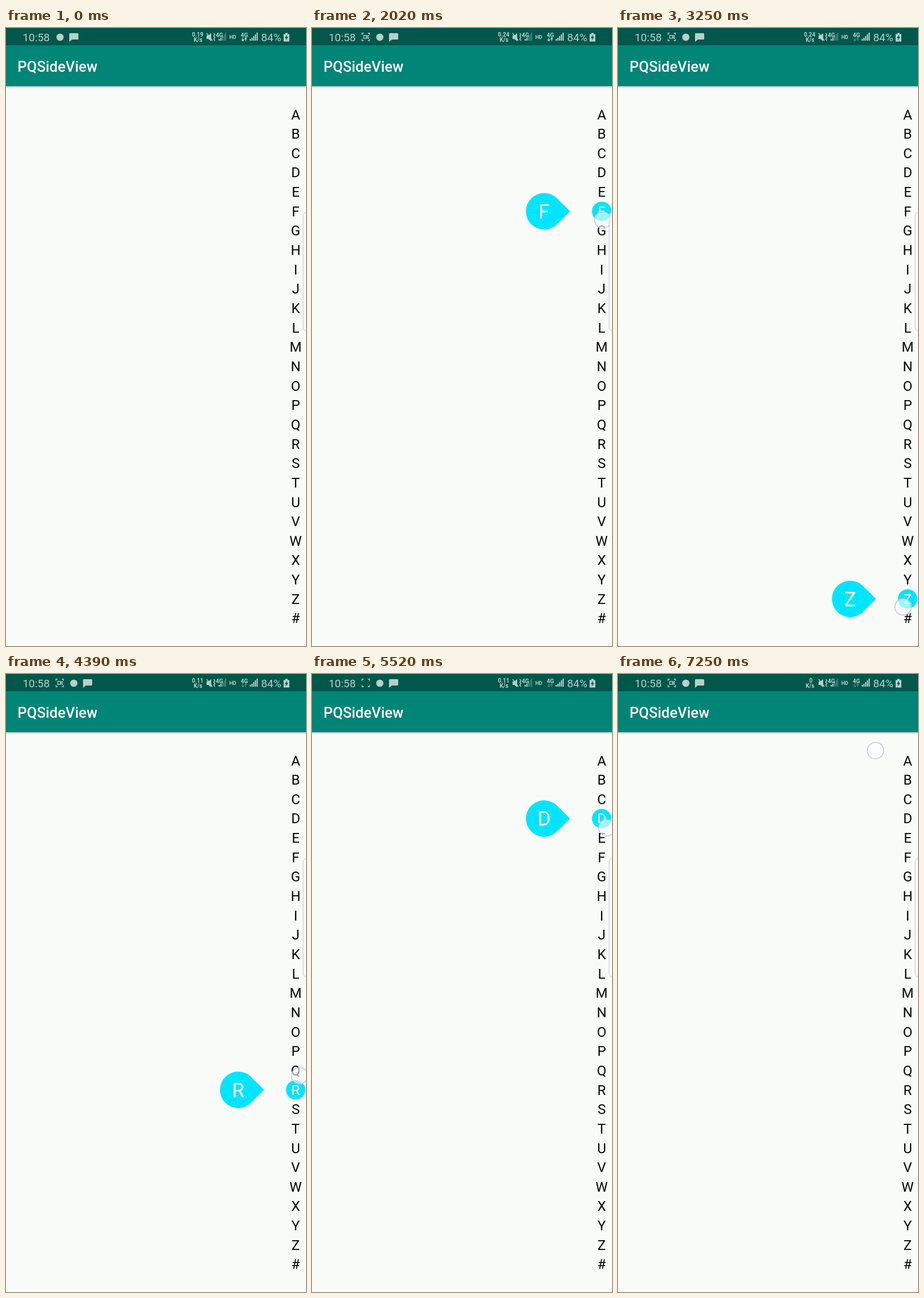
Animation of 522 by 1073 pixels, one loop 7.29 s. Source, as an HTML page:

```html
<!DOCTYPE html>
<html lang="en">
<head>
<meta charset="utf-8">
<title>PQSideView</title>
<style>
  html, body { margin: 0; width: 100%; height: 100%; overflow: hidden; background: #f9fbf9; }
  svg { display: block; width: 522px; height: 1073px; font-family: Roboto, "Noto Sans", sans-serif; }
  .mid { text-anchor: middle; }
  .status { fill: #b7cfcb; }
  .small { font-size: 10px; font-weight: 700; }
  .letter { font-size: 24px; fill: #050505; }
  .letter.on { fill: #fff; }
  .accent { fill: #00e5ff; }
</style>
</head>
<body>
<svg viewBox="0 0 522 1073">
  <defs>
    <linearGradient id="shade" x2="0" y2="1">
      <stop offset="0" stop-color="#b9c6c4"/>
      <stop offset="1" stop-color="#f9fbf9"/>
    </linearGradient>
  </defs>
  <rect width="522" height="1073" fill="#f9fbf9"/>
  <rect y="101" width="522" height="4" fill="url(#shade)"/>
  <rect y="30" width="522" height="71" fill="#008577"/>
  <rect width="522" height="30" fill="#00574b"/>
  <text x="20" y="76" font-size="25.4" font-weight="500" fill="#fff">PQSideView</text>

  <g class="status">
    <text x="29" y="23" font-size="18.9">10:58</text>
    <g id="rec" fill="none" stroke="#b7cfcb" stroke-width="1.3">
      <path d="M87 12V9h3M97 9h3v3M100 19v3h-3M90 22h-3v-3"/>
      <path id="camera" d="M90 13h5v5h-5zM95 15l3-2v5l-3-2"/>
    </g>
    <g id="icons">
      <circle cx="94" cy="16" r="6.3"/>
      <path d="M111.500 9h13q1.500 0 1.500 1.500v8q0 1.500-1.500 1.500h-9.500l-5 4v-13.500q0-1.500 1.500-1.500z"/>
    </g>

    <text id="rate" class="mid small" x="333.500" y="15">0.19</text>
    <text class="mid small" x="334" y="24">K/s</text>
    <path d="M349 13h3l5-4v14l-5-4h-3z"/>
    <path d="M349 9l10 13M361.500 9l2 2.500-2 2.500 2 2.500-2 2.500 2 3" fill="none" stroke="#b7cfcb" stroke-width="1.400"/>
    <path d="M370 19h2v3h-2zM373 17h2v5h-2z"/>
    <path d="M376 14h2v8h-2zM379 11h1.500v11h-1.500zM381.500 8h1.500v14h-1.500z" opacity=".45"/>
    <text class="small" x="365" y="16" font-weight="500">4G</text>
    <text class="small" x="388.500" y="18.500" style="font-size:9px">HD</text>
    <text class="small" x="408.500" y="15.500">4G</text>
    <path id="arrows" d="M412 17v5M410 20l2 2.500 2-2.500M417 22.500v-5M415 19.500l2-2.500 2 2.500" fill="none" stroke="#b7cfcb" stroke-width="1.300"/>
    <path d="M424 19h2v3h-2zM427 17h2v5h-2zM430 14h2v8h-2zM433 11h2v11h-2zM436 8h2v14h-2z"/>
    <text x="444" y="23" font-size="18.9">84%</text>
    <path d="M486 8.500h4v2h3v13h-10v-13h3z"/>
    <path d="M489 11.500l-4 6h2.500l-.500 4 4-6h-2.500z" fill="#00574b"/>
  </g>

  <circle id="dot" class="accent" cx="504" r="16.800"/>
  <g id="letters"></g>
  <g id="callout">
    <path class="accent" d="M426.500-22.300 A31.700 31.700 0 1 0 426.500 22.300 L449 0z"/>
    <text id="big" class="mid" x="404" y="12.500" font-size="35" fill="#fff"></text>
  </g>
  <circle id="finger" r="14.200" fill="#fff" fill-opacity=".6" stroke="#c6c8e2" stroke-width="1.600"/>
  <rect x="517" y="320" width="20" height="206" rx="6" fill="#fafbfa" fill-opacity=".65" stroke="#c3c7c5"/>
</svg>
<script>
const LOOP = 7290, TOP = 150, STEP = 33.65;
const names = [..."ABCDEFGHIJKLMNOPQRSTUVWXYZ#"];
const el = id => document.getElementById(id);

// Each stroke: time, finger x, finger y, offset of the selection from the finger.
const strokes = [
  [[1430, 505, 150, 0], [1600, 506, 165, 0], [2020, 506, 333, 0], [2150, 505, 395, 0],
   [2910, 499, 866, 0], [3250, 496, 1005, 0], [3400, 496, 1035, 0], [3490, 496, 1038, 0]],
  [[3750, 500, 1019, -20], [4390, 511, 698, 10], [4470, 512, 655, 5], [5060, 514, 381, -18],
   [5990, 512, 151, 0], [6600, 510, 157, 0]]
];
const tap = { from: 7210, x: 448, y: 133 };
const cameraOff = [[970, 1470], [2470, 2970], [3790, 4200], [5470, 6060], [6590, 7210]];

const labels = names.map((name, i) => {
  const label = document.createElementNS("http://www.w3.org/2000/svg", "text");
  label.textContent = name;
  label.setAttribute("x", 504);
  label.setAttribute("y", TOP + 8.5 + i * STEP);
  el("letters").append(label);
  return label;
});

function show(node, on) {
  node.style.display = on ? "" : "none";
}

function place(node, x, y) {
  node.setAttribute("transform", `translate(${x} ${y})`);
}

function sample(keys, t) {
  const i = keys.findIndex(key => key[0] > t);
  const a = keys[i - 1], b = keys[i];
  const u = (t - a[0]) / (b[0] - a[0]);
  return a.map((v, k) => v + (b[k] - v) * u);
}

function drawStatus(t) {
  const slide = Math.min(1, Math.max(0, (t - 120) / 300));
  place(el("icons"), 24 * slide, 0);
  el("rec").style.opacity = slide;
  show(el("camera"), !cameraOff.some(([from, to]) => t >= from && t < to));
  el("rate").textContent = t < 760 ? "0.19" : t < 3790 ? "0.24" : t < 6830 ? "0.11" : "0";
  el("rate").setAttribute("x", t < 6830 ? 333.5 : 335.5);
  el("arrows").style.opacity = t < 2950 ? 1 : 0.4;
}

function drawTouch(t) {
  const stroke = strokes.find(s => t >= s[0][0] && t < s[s.length - 1][0]);
  let picked = -1;
  if (stroke) {
    const [, x, y, offset] = sample(stroke, t);
    picked = Math.max(0, Math.min(26, Math.round((y + offset - TOP) / STEP)));
    place(el("finger"), x, y);
  } else {
    place(el("finger"), tap.x, tap.y);
  }
  show(el("finger"), stroke || t >= tap.from);
  show(el("dot"), stroke);
  show(el("callout"), stroke);
  labels.forEach((label, i) => {
    label.setAttribute("class", "mid letter" + (i === picked ? " on" : ""));
  });
  if (stroke) {
    const y = TOP + picked * STEP;
    el("dot").setAttribute("cy", y);
    place(el("callout"), 0, y);
    el("big").textContent = names[picked];
  }
}

function frame() {
  const t = performance.now() % LOOP;
  drawStatus(t);
  drawTouch(t);
  requestAnimationFrame(frame);
}
frame();
</script>
</body>
</html>
```
